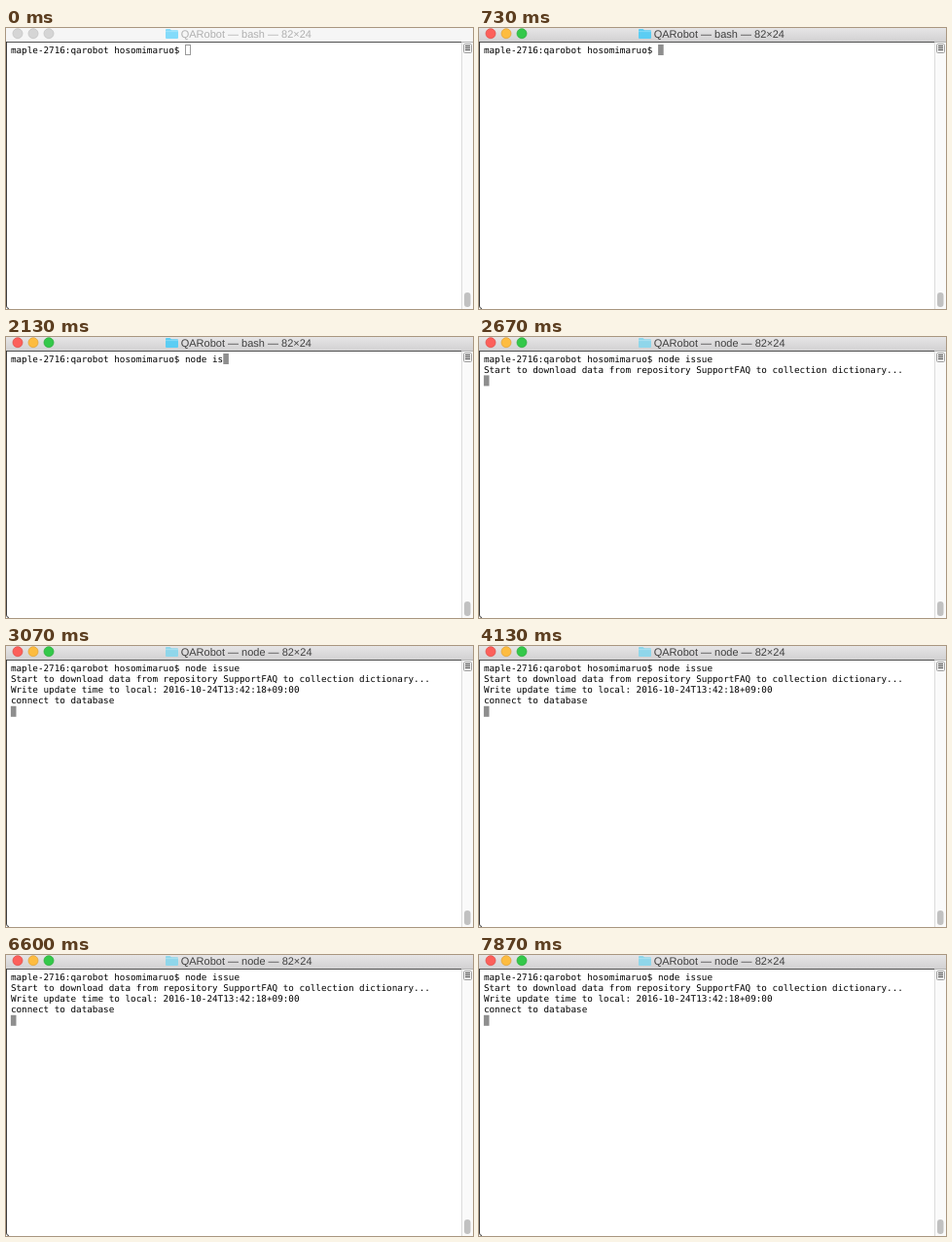
Write an HTML page that moves like this. It is 480 px wide and 289 px high and loops after 8000 ms.

```html
<!DOCTYPE html>
<html lang="en">
<head>
<meta charset="utf-8">
<title>Terminal</title>
<style>
html, body { margin: 0; width: 100%; height: 100%; overflow: hidden; background: #fff; }
svg { display: block; width: 480px; height: 289px; }
text { white-space: pre; text-rendering: geometricPrecision; }
.mono { font: 9.3px "DejaVu Sans Mono", monospace; fill: #000; }
.title { font: 11px "Liberation Sans", Arial, sans-serif; }
</style>
</head>
<body>
<svg viewBox="0 0 480 289">
  <defs>
    <linearGradient id="bar" x2="0" y2="1">
      <stop offset="0" stop-color="#e6e5e6"/>
      <stop offset="1" stop-color="#d2d1d2"/>
    </linearGradient>
  </defs>
  <rect width="480" height="289" fill="#fff"/>
  <rect id="head" width="480" height="14"/>
  <rect y="14" width="468" height="1" fill="#505050"/>
  <rect x="468" y="14" width="12" height="1" fill="#b4b4b4"/>
  <path d="M.5 14V286Q.5 288.5 3 288.5" fill="none" stroke="#3c3c3c"/>

  <g id="lights" stroke-width=".7">
    <circle cx="12" cy="5.7" r="5"/>
    <circle cx="28" cy="5.7" r="5"/>
    <circle cx="44" cy="5.7" r="5"/>
  </g>
  <g id="folder">
    <path d="M164 2Q164 1 165 1H168.5L170 2.2H176Q177 2.2 177 3.2V10Q177 11 176 11H165Q164 11 164 10Z"/>
    <path d="M164 3.6H177" stroke="#fff" stroke-opacity=".35" stroke-width=".7"/>
  </g>
  <text id="title" class="title" x="179.7" y="9.8"></text>

  <rect x="469" y="15" width="11" height="274" fill="#fafafa"/>
  <path d="M468.5 15V289" stroke="#dcdcdc"/>
  <rect x="470.5" y="16.5" width="8" height="9" rx="1" fill="#f4f4f4" stroke="#a0a0a0"/>
  <path d="M472 18.5H477M472 20.5H477M472 22.5H477" stroke="#444"/>
  <rect x="471" y="272" width="6.5" height="15" rx="3.2" fill="#c1c1c1"/>

  <rect id="cursor" width="5.6" height="11"/>
  <g id="lines" class="mono"></g>
</svg>
<script>
const LOOP = 8000, LEFT = 4.9, CELL = 5.6, ROW = 11.2;
const ACTIVE = 330, LAUNCH = 2600;
const PROMPT = "maple-2716:qarobot hosomimaruo$ ";
const COMMAND = "node issue";
// time at which each character of the command appears
const KEYS = [800, 870, 1000, 1070, 1130, 1730, 2070, 2270, 2330, 2400];
const OUTPUT = [
  [2670, "Start to download data from repository SupportFAQ to collection dictionary..."],
  [2930, "Write update time to local: 2016-10-24T13:42:18+09:00"],
  [3000, "connect to database"]
];
const ENTER = 2530;
const COLORS = [["#fc605b", "#df4843"], ["#fdbc40", "#de9f34"], ["#34c84a", "#27aa35"]];
const GREY = ["#d5d5d5", "#c0c0c0"];

const get = id => document.getElementById(id);
const set = (el, attrs) => {
  for (const key in attrs) el.setAttribute(key, attrs[key]);
};

const rows = Array.from({ length: 4 }, (_, i) => {
  const row = document.createElementNS("http://www.w3.org/2000/svg", "text");
  set(row, { x: LEFT, y: 25.5 + i * ROW });
  return get("lines").appendChild(row);
});

function drawWindow(active, running) {
  set(get("head"), { fill: active ? "url(#bar)" : "#f6f6f6" });
  [...get("lights").children].forEach((light, i) => {
    const [fill, stroke] = active ? COLORS[i] : GREY;
    set(light, { fill, stroke });
  });
  set(get("folder"), { fill: !active ? "#84dbfa" : running ? "#8fd6ea" : "#5bcdf3" });
  set(get("title"), { fill: active ? "#404040" : "#b0b0b0" });
  get("title").textContent = `QARobot — ${running ? "node" : "bash"} — 82×24`;
}

function drawCursor(col, row, active) {
  const x = LEFT + col * CELL, y = 17 + row * ROW;
  set(get("cursor"), active
    ? { x, y, width: CELL, height: 11, fill: "#8e8e8e", stroke: "none" }
    : { x: 184.5, y: 17.5, width: 5, height: 10, fill: "none", stroke: "#9a9a9a" });
}

let last = "";
function draw(t) {
  const active = t >= ACTIVE, running = t >= LAUNCH;
  const typed = KEYS.filter(k => t >= k).length;
  const shown = OUTPUT.filter(([at]) => t >= at).length;
  const entered = t >= ENTER;
  const state = [active, running, typed, shown, entered].join();
  if (state === last) return;
  last = state;

  drawWindow(active, running);
  rows[0].textContent = PROMPT + COMMAND.slice(0, typed);
  OUTPUT.forEach(([, line], i) => rows[i + 1].textContent = i < shown ? line : "");
  if (entered) drawCursor(0, shown + 1, active);
  else drawCursor(PROMPT.length + typed, 0, active);
}

const start = performance.now();
function tick() {
  draw((performance.now() - start) % LOOP);
  requestAnimationFrame(tick);
}
tick();
</script>
</body>
</html>
```
